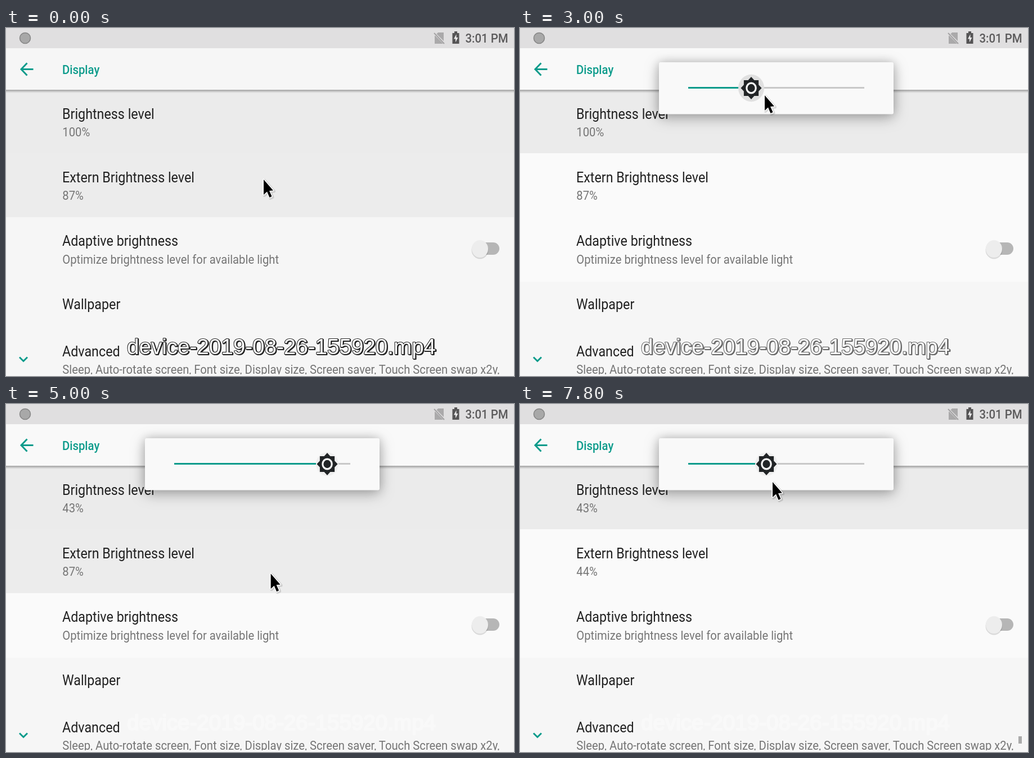
An HTML page that plays this animation: 903 by 620 pixels, repeating every 8000 ms.

```html
<!DOCTYPE html>
<html lang="en">
<head>
<meta charset="utf-8">
<title>Display settings</title>
<style>
  html, body { margin: 0; width: 100%; height: 100%; overflow: hidden; background: #f6f6f6; }
  svg { display: block; width: 903px; height: 620px; }
  text { font-family: Roboto, sans-serif; white-space: pre; }
  .title { font-size: 23.3px; fill: #212121; }
  .note { font-size: 20.25px; fill: #757575; }
  .bar { font-size: 20.3px; font-weight: 500; fill: #0c9b8b; }
  .clock { font-size: 20.4px; font-weight: 500; fill: #5b5a5b; }
  .stamp { font: 38.6px "Liberation Sans", Arial, sans-serif; stroke-width: 2.2; stroke-linejoin: round; paint-order: stroke; }
  .teal { fill: none; stroke: #0c9b8b; stroke-width: 3; }
  .card { fill: #f9f9f9; filter: drop-shadow(0 6px 13px rgba(0,0,0,.27)) drop-shadow(0 0 8px rgba(0,0,0,.17)); }
</style>
</head>
<body>
<svg viewBox="0 0 903 620">
  <defs>
    <linearGradient id="edge" x2="0" y2="1">
      <stop stop-color="#a8a8a8"/><stop offset=".3" stop-color="#b4b4b4"/>
      <stop offset="1" stop-color="#c8c8c8" stop-opacity="0"/>
    </linearGradient>
    <path id="arrow" d="M0 0V27L6 21.500 10.500 32 14.500 30 10 20 17 19.500z" stroke-linejoin="round"/>
  </defs>

  <rect width="903" height="620" fill="#f6f6f6"/>
  <rect id="appBar" y="36" width="903" height="74"/>
  <rect y="110" width="903" height="113" fill="#ebebeb"/>
  <rect id="row2" y="223" width="903" height="114"/>
  <rect id="row3" y="337" width="903" height="115"/>
  <rect y="110" width="903" height="6" fill="url(#edge)"/>

  <rect width="903" height="36" fill="#e0dfe0"/>
  <circle cx="34" cy="18" r="9.5" fill="#a8a8a8" stroke="#858585" stroke-width="1.5"/>
  <path d="M768 8h10v20h-16V14z" fill="#aaa9aa"/>
  <path d="M760 8l20 20" stroke="#e0dfe0" stroke-width="4"/>
  <path d="M761 9l18 19" stroke="#a3a2a3" stroke-width="2"/>
  <path d="M797 6h5v3h3.500v19h-12V9h3.500z" fill="#555455"/>
  <path d="M800.500 11l-4.500 8.500h3v6l4.500-8.500h-3z" fill="#e8e7e8"/>

  <path class="teal" d="M48.500 73.500H27.500M37.500 62.500L27 73.500 37.500 84.500"/>
  <path class="teal" d="M24 586.500l7 7 7-7"/>
  <g id="labels"></g>

  <rect x="836" y="382" width="41" height="22" rx="11" fill="#b6b6b6"/>
  <ellipse cx="842.500" cy="395.500" rx="15" ry="16" opacity=".13"/>
  <ellipse cx="842.500" cy="393.500" rx="14.500" ry="15.500" fill="#ededed"/>
  <rect id="scrollBar" x="886" y="592" width="6" height="13" fill="#aaa"/>
  <rect y="617" width="903" height="3" fill="#f8f8f8"/>
  <g id="ghost"></g>
  <g id="stamp"></g>

  <g id="dialog">
    <rect class="card" x="247" y="61" width="417" height="92.500" rx="3"/>
    <rect x="299" y="105" width="313" height="3" fill="#c8c8c8"/>
    <rect id="filled" x="299" y="105" height="3" fill="#0c9b8b"/>
    <g id="thumb">
      <ellipse id="halo"/>
      <g transform="scale(1.64 1.76) translate(-12 -12)">
        <path fill="#212426" d="M20 8.690V4h-4.690L12 .690 8.690 4H4v4.690L.690 12 4 15.310V20h4.690L12 23.310 15.310 20H20v-4.690L23.310 12z"/>
        <circle cx="12" cy="12" r="5" fill="#212426" stroke="#fafafa" stroke-width="1.900"/>
      </g>
    </g>
  </g>

  <g id="cursor">
    <use href="#arrow" x="1.500" y="1.500" stroke="#000" stroke-width="5" opacity=".12"/>
    <use href="#arrow" stroke="#fff" stroke-width="3"/>
    <use href="#arrow"/>
  </g>
</svg>
<script>
const LOOP = 8000, STEP = 200;
const TRACK = { left: 299, width: 313 };
const $ = id => document.getElementById(id);

function set(id, attributes) {
  for (const [name, value] of Object.entries(attributes)) $(id).setAttribute(name, value);
}

function addText(parent, content, attributes) {
  const el = document.createElementNS('http://www.w3.org/2000/svg', 'text');
  for (const [name, value] of Object.entries(attributes)) el.setAttribute(name, value);
  el.textContent = content;
  $(parent).append(el);
  return el;
}

const label = (cls, x, y, content) =>
  addText('labels', content, { class: cls, transform: `translate(${x} ${y}) scale(1 1.1)` });

function row(y, title, note) {
  label('title', 100, y, title);
  return note === undefined ? null : label('note', 100.3, y + 31.5, note);
}

label('clock', 816.5, 25.5, '3:01 PM');
label('bar', 100, 82, 'Display');
const levelNote = row(161.5, 'Brightness level', '');
const externNote = row(274.8, 'Extern Brightness level', '');
row(388, 'Adaptive brightness', 'Optimize brightness level for available light');
row(501.3, 'Wallpaper');
row(584.5, 'Advanced', 'Sleep, Auto-rotate screen, Font size, Display size, Screen saver, Touch Screen swap x2y,');

function stampText(parent, offset, fill, stroke) {
  addText(parent, 'device-2019-08-26-155920.mp4',
    { class: 'stamp', x: 215 + offset, y: 581 + offset, fill, stroke });
}
stampText('ghost', 0, '#f9f9f9', '#f9f9f9');
stampText('stamp', 1.3, '#222', '#222');
stampText('stamp', 0, '#fff', '#222');

const clamp = (v, low, high) => Math.min(high, Math.max(low, v));
const smooth = k => k * k * (3 - 2 * k);

// The pointer's journey, built from eased moves and rests.
const journey = {
  clock: 0, x: 457, y: 270, moves: [],
  go(duration, x, y) {
    this.moves.push({ begin: this.clock, duration, dx: x - this.x, dy: y - this.y });
    Object.assign(this, { clock: this.clock + duration, x, y });
    return this;
  },
  rest(duration) { return this.go(duration, this.x, this.y); }
};
journey
  .go(800, 450, 188).rest(600)
  .go(600, 611, 108).rest(200)
  .go(600, 411, 118).go(200, 434, 120).rest(200)
  .go(600, 501, 307).go(400, 464, 290).rest(600)
  .go(800, 500, 368).go(400, 571, 110).rest(200)
  .go(600, 438, 114).go(400, 454, 183).go(600, 448, 139);

function pointer(t) {
  const at = { x: 457, y: 270 };
  for (const { begin, duration, dx, dy } of journey.moves) {
    const k = smooth(clamp((t - begin) / duration, 0, 1));
    at.x += dx * k;
    at.y += dy * k;
  }
  return at;
}

// Each setting: its dialog opens, the knob is dragged, then the value is saved.
const settings = [
  { open: 800, grab: 2200, release: 3200, close: 4000 },
  { open: 4400, grab: 6200, release: 6800, close: LOOP }
];
const SETTLE = 400, LAG = 200;

// The knob trails the pointer while it is held.
const knobX = (s, t) => pointer(clamp(t - LAG, s.grab, s.release)).x;
const percent = x => Math.round((x - TRACK.left) / TRACK.width * 100) + '%';
const isSaved = (s, t) => t >= s.release + LAG;
const savedText = (s, t) => percent(knobX(s, isSaved(s, t) ? t : 0));

function draw(t) {
  const [main, extern] = settings;
  const current = t < extern.open ? main : extern;
  const age = t - current.open;
  const settled = age >= SETTLE;
  const knob = knobX(settled ? current : main, t);
  const held = t >= current.grab && t < current.release;
  const untouched = t < main.open + LAG;
  const pressed = untouched || current === extern && age < 1400;
  const { x, y } = pointer(t);

  set('appBar', { fill: untouched ? '#f6f6f6' : '#f9f9f9' });
  set('row2', { fill: pressed ? '#ececec' : '#fafafa' });
  set('row3', { fill: untouched ? '#f6f6f6' : '#fafafa' });
  levelNote.textContent = savedText(main, t);
  externNote.textContent = savedText(extern, t);
  const scrolling = settings.some(s => isSaved(s, t) && t < s.release + 1600);
  set('scrollBar', { opacity: +scrolling });
  set('stamp', { opacity: clamp((4000 - t) / 1500, 0, 1) });

  const shown = age >= 0 && t < current.close;
  set('dialog', {
    transform: `translate(0 ${settled ? 0 : 136})`,
    opacity: !shown ? 0 : age < STEP ? .93 : 1
  });
  set('filled', { width: knob - TRACK.left });
  set('thumb', { transform: `translate(${knob} 107)` });
  const radius = held ? 23 : t < main.grab ? 0 : 20;
  set('halo', { rx: radius, ry: radius * 1.05, fill: held ? '#e0e0e0' : '#efefef' });
  set('cursor', { transform: `translate(${x + 1} ${y})` });
}

const start = performance.now();
function tick() {
  const t = (performance.now() - start) % LOOP;
  draw(Math.floor(t / STEP) * STEP);
  requestAnimationFrame(tick);
}
tick();
</script>
</body>
</html>
```
